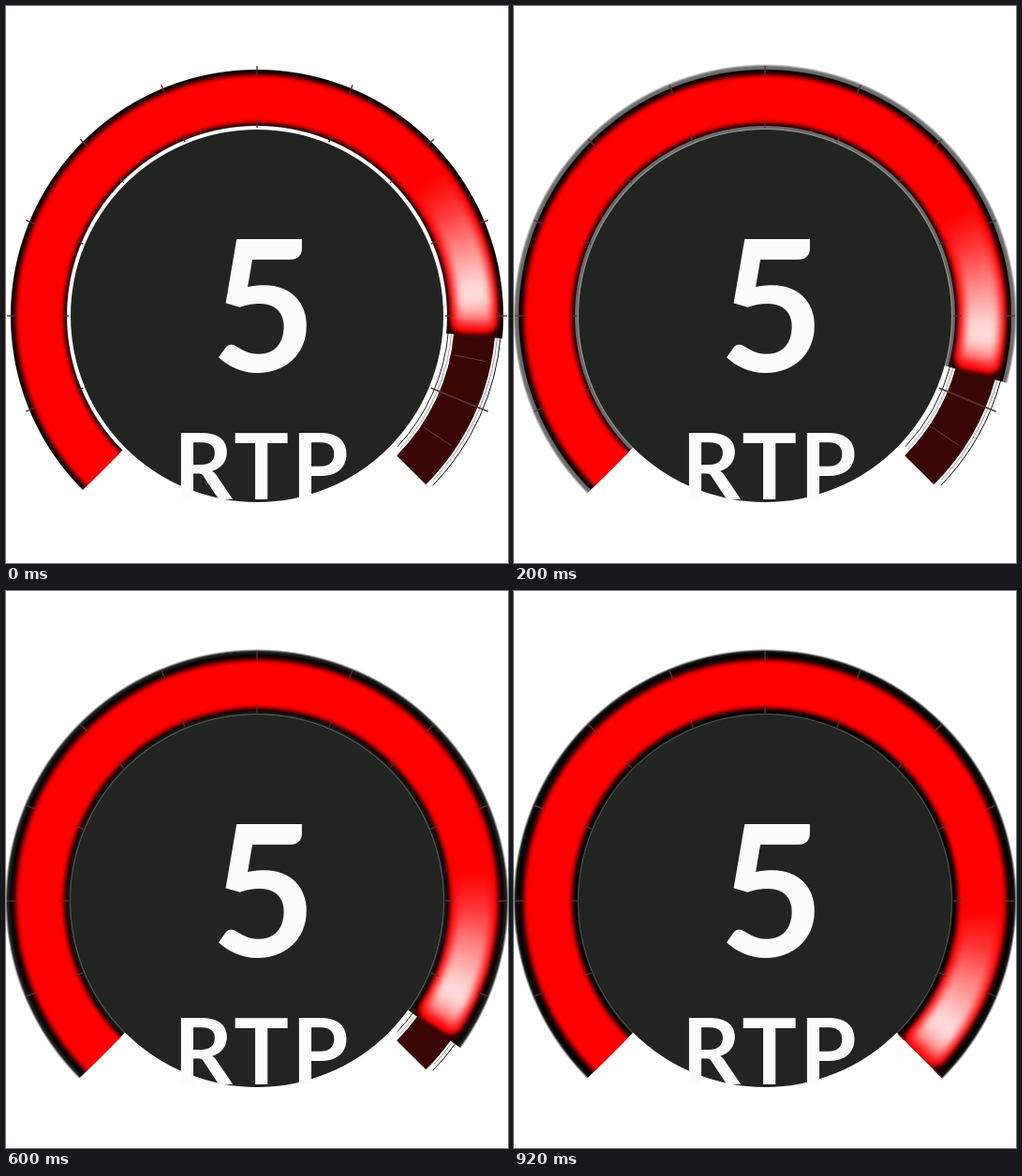
An HTML page with a canvas for the animation above (1 s loop, 536 px wide and 595 px high).

```html
<!DOCTYPE html>
<html lang="en">
<head>
<meta charset="utf-8">
<title>RTP gauge</title>
<style>
  html, body { margin: 0; width: 100%; height: 100%; overflow: hidden; background: #fff; }
  canvas { display: block; }
</style>
</head>
<body>
<canvas id="stage" width="536" height="595"></canvas>
<script>
const ctx = document.getElementById('stage').getContext('2d');
const CX = 268, CY = 331, START = 135, END = 405;
const STEP = 200, STEPS = 5;
const HALO = [0, 0.6, 0.85, 0.95, 1];
const rad = deg => deg * Math.PI / 180;

function arc(r, from, to, width, style, blur = 0) {
  ctx.filter = blur ? `blur(${blur}px)` : 'none';
  ctx.beginPath();
  ctx.arc(CX, CY, r, rad(from), rad(to));
  ctx.lineWidth = width;
  ctx.strokeStyle = style;
  ctx.stroke();
  ctx.filter = 'none';
}

function tick(deg, r1, r2, width, style) {
  const c = Math.cos(rad(deg)), s = Math.sin(rad(deg));
  ctx.beginPath();
  ctx.moveTo(CX + r1 * c, CY + r1 * s);
  ctx.lineTo(CX + r2 * c, CY + r2 * s);
  ctx.lineWidth = width;
  ctx.strokeStyle = style;
  ctx.stroke();
}

// Centres the inked part of the text on x
function label(text, size, x, y, spacing) {
  ctx.font = `700 ${size}px Lato, sans-serif`;
  ctx.letterSpacing = spacing + 'px';
  const m = ctx.measureText(text);
  const shift = (m.actualBoundingBoxLeft - m.actualBoundingBoxRight) / 2;
  ctx.fillStyle = '#fafdf9';
  ctx.fillText(text, x + shift, y);
}

function drawTrack(head) {
  arc(233, head, END, 44, '#3a0604');
  arc(261, head, END - 1, 1, '#111');
  arc(257.5, head, END - 2, 0.6, '#555');
  arc(205, head, END - 2, 1, '#222');
  arc(208.5, head, END - 2, 0.6, '#666');
  for (const deg of [371.25, 393.75])
    if (deg > head) tick(deg, 214, 249, 1, '#6b3a37');
  if (head < 382) tick(382.5, 201, 267, 1.6, '#5a3835');
}

function drawShadow(head, halo) {
  const g = ctx.createRadialGradient(CX, CY, 198, CX, CY, 270);
  const stop = (r, alpha, red = 0) =>
    g.addColorStop((r - 198) / 72, `rgba(${red},0,0,${alpha})`);
  stop(199, halo * 0.6);
  stop(200.5, halo * 0.95);
  stop(202.5, halo);
  stop(203.5, 1, 20);
  stop(208, 1, 50);
  stop(257, 1, 50);
  stop(262.5, 1, 10);
  stop(263.5, halo);
  stop(266.5, halo * 0.9);
  stop(269, 0);
  arc(234, START, head + 0.5, 72, g);
}

// Red band with a rounded, soft leading end
function drawBand(head) {
  const round = 14, end = rad(head - 3.6);
  ctx.filter = 'blur(2.2px)';
  ctx.beginPath();
  ctx.arc(CX, CY, 257 - round, rad(START - 8), end);
  ctx.arc(CX, CY, 206.5 + round, end, rad(START - 8), true);
  ctx.closePath();
  ctx.lineJoin = 'round';
  ctx.lineWidth = 2 * round;
  ctx.fillStyle = ctx.strokeStyle = '#f00';
  ctx.fill();
  ctx.stroke();
  ctx.filter = 'none';
}

function drawGlow(head) {
  const g = ctx.createConicGradient(rad(START), CX, CY);
  const stop = (back, alpha) =>
    g.addColorStop((head - START - back) / 360, `rgba(255,255,255,${alpha})`);
  stop(43, 0);
  stop(33, 0.22);
  stop(22, 0.57);
  stop(13, 0.83);
  stop(9, 0.86);
  stop(5, 0.6);
  stop(2, 0.15);
  stop(0, 0);
  arc(232, head - 43, head - 2, 38, g, 4);
}

function draw(step) {
  const head = 364.8 + step * 10.2;
  ctx.fillStyle = '#fff';
  ctx.fillRect(0, 0, 536, 595);
  if (head < END) drawTrack(head);

  ctx.save();
  ctx.beginPath();
  ctx.moveTo(CX, CY);
  ctx.arc(CX, CY, 300, rad(START), rad(END));
  ctx.clip();
  drawShadow(head, HALO[step]);
  drawBand(head);
  drawGlow(head);
  ctx.restore();

  for (let deg = 157.5; deg < head; deg += 22.5) {
    tick(deg, 201, 210, 1.4, 'rgb(96,48,46)');
    tick(deg, 255, 267, 1.4, 'rgb(96,48,46)');
  }

  ctx.beginPath();
  ctx.arc(CX, CY, 199, 0, 2 * Math.PI);
  ctx.fillStyle = '#222421';
  ctx.fill();
  label('5', 195, 274, 389.5, 0);
  label('RTP', 98, 275, 527, 3);
}

function frame(now) {
  draw(Math.floor(now / STEP) % STEPS);
  requestAnimationFrame(frame);
}
draw(0);
requestAnimationFrame(frame);
</script>
</body>
</html>
```
